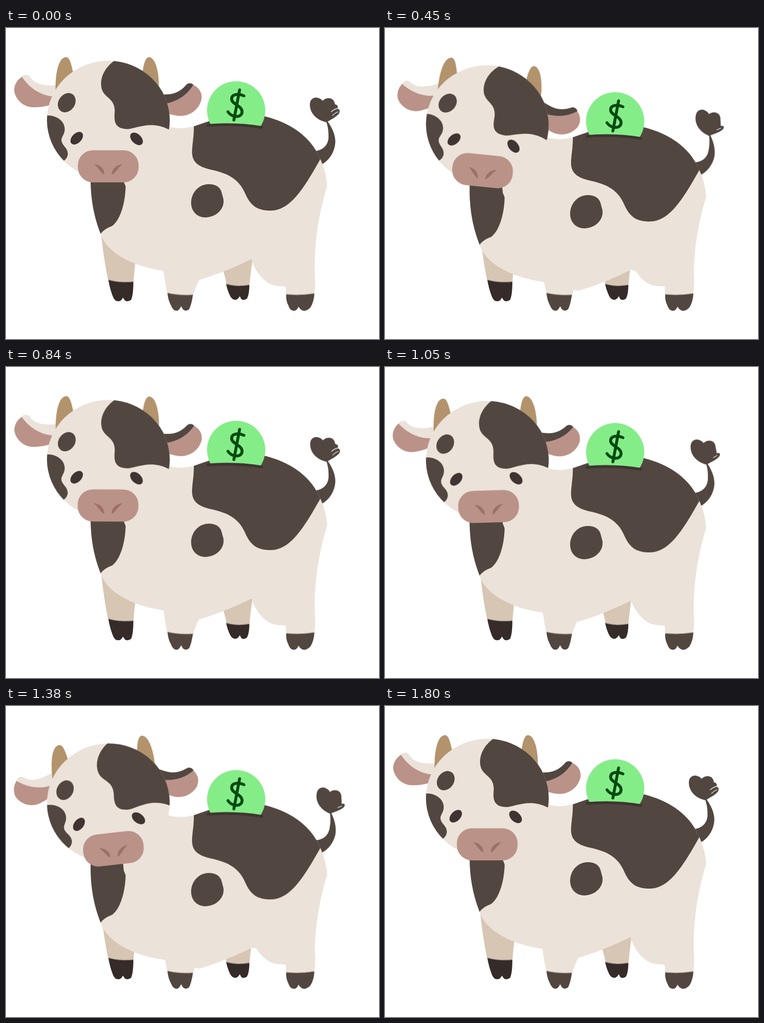
Animation of 820 by 683 pixels, one loop 1.86 s. Source, as an HTML page without scripts:

```html
<!DOCTYPE html>
<html lang="en">
<head>
<meta charset="utf-8">
<title>Cow bank</title>
<style>
  html, body { margin: 0; width: 100%; height: 100%; overflow: hidden; background: #fff; }
  svg { display: block; width: 100vw; height: 100vh; }

  .cream { fill: #ebe2d9; }
  .dark { fill: #524740; }
  .tan { fill: #d7c6b4; }
  .hoof { fill: #352b29; }
  .horn { fill: #b3936c; }
  .pink { fill: #bb9288; }
  .nostril { fill: #9b7067; }
  .eye { fill: #3f3431; }
  .coin { fill: #84ed88; }
  .line { fill: none; stroke-linecap: round; stroke-linejoin: round; }
  .slot { stroke: #3f3431; stroke-width: 6; }
  .sign { stroke: #034a10; stroke-width: 6.4; }
  .gap { stroke: #fff; stroke-width: 1.3; }
  .cuff { stroke: #9a8f86; stroke-width: 1.4; stroke-linecap: butt; }

  /* 1800 ms of movement, then a 60 ms rest */
  .bob, .tail, .head, .ear, .strands { animation: bob 1860ms cubic-bezier(.365, 0, .635, 1) infinite; }
  .tail { animation-name: tail; transform-origin: 675px 255px; }
  .head { animation-name: head; transform-origin: 225px 202px; }
  .left { animation-name: left-ear; transform-origin: 103px 135px; }
  .right { animation-name: right-ear; transform-origin: 352px 155px; }
  .strands { animation-name: strands; animation-timing-function: step-end; }

  @keyframes bob {
    0%, 48.387%, 96.774%, 100% { transform: translateY(0); }
    24.194%, 72.581% { transform: translateY(24px); }
  }
  @keyframes tail {
    0%, 48.387%, 96.774%, 100% { transform: rotate(0deg); }
    24.194%, 72.581% { transform: rotate(10deg); }
  }
  @keyframes head {
    0%, 48.387%, 96.774%, 100% { transform: translateY(0) rotate(0deg); }
    24.194% { transform: translateY(10px) rotate(5.8deg); }
    72.581% { transform: translateY(10.5px) rotate(-6.5deg); }
  }
  @keyframes left-ear {
    0%, 48.387%, 96.774%, 100% { transform: rotate(0deg); animation-timing-function: cubic-bezier(.4, .3, .65, 1); }
    24.194%, 72.581% { transform: rotate(-20deg); animation-timing-function: cubic-bezier(.35, 0, .6, .7); }
  }
  @keyframes right-ear {
    0%, 48.387%, 96.774%, 100% { transform: rotate(0deg); animation-timing-function: cubic-bezier(.4, .3, .65, 1); }
    24.194%, 72.581% { transform: rotate(25deg); animation-timing-function: cubic-bezier(.35, 0, .6, .7); }
  }
  @keyframes strands {
    0%, 43.548%, 91.935% { opacity: 1; }
    4.839%, 53.226% { opacity: 0; }
  }
</style>
</head>
<body>
<svg viewBox="0 0 820 683" preserveAspectRatio="none">
  <defs>
    <clipPath id="face"><ellipse cx="225" cy="202" rx="135" ry="130"/></clipPath>
    <clipPath id="above"><path d="M430 100H580V219L563 218Q505 208 444 214L430 214Z"/></clipPath>
  </defs>

  <!-- far legs -->
  <path class="tan" d="M209 440L210 460Q216 515 225 556L280 559Q282 535 286 500V440Z"/>
  <path class="hoof" d="M225 553Q250 560 280 557Q280 586 275 597Q267 603 261 598L257 592Q253 601 246 600Q239 600 235 590Q228 572 225 553Z"/>
  <path class="line cuff" d="M225 553Q250 560 280 557"/>
  <path class="tan" d="M470 500L478 535Q483 550 485 564L535 566Q538 535 543 500Z"/>
  <path class="hoof" d="M484 562Q508 569 535 564Q535 584 530 594Q523 600 517 595L514 589Q510 597 503 597Q496 596 492 587Q486 574 484 562Z"/>
  <path class="line cuff" d="M484 562Q508 569 535 564"/>

  <!-- near legs -->
  <path class="cream" d="M344 515L346 533Q350 562 355 584L411 588Q416 570 425 553V515Z"/>
  <path class="dark" d="M355 582Q382 588 411 586Q408 606 403 617Q396 624 389 618L385 611Q381 621 374 621Q367 620 363 610Q356 597 355 582Z"/>
  <path class="line cuff" d="M355 582Q382 588 411 586"/>
  <path class="cream" d="M536 490L541 513C555 548 578 568 604 567L615 568L616 588L677 586Q681 565 679 543L678 500L640 450Z"/>
  <path class="dark" d="M616 585Q647 588 678 583Q677 602 669 614Q661 622 654 621Q648 620 643 612Q639 622 632 621Q624 620 621 610Q615 599 616 585Z"/>
  <path class="line cuff" d="M616 585Q647 588 678 583"/>

  <g class="bob">
    <g class="tail">
      <path class="dark" d="M672 272L682 270C699 267 710 255 709 236C709 224 707 214 704 206L707 205C717 219 724 234 724 250C723 273 710 290 697 298L680 300Z"/>
      <path class="dark" d="M705 207C685 203 668 189 668 168C668 156 677 152 684 153Q693 155 696 160C702 153 712 152 718 157C724 163 722 167 724 171L726 181C734 178 735 184 731 189C725 196 714 201 705 207Z"/>
      <path class="line gap" d="M719 191L727 186"/>
      <g class="strands">
        <path class="dark" d="M720 167C730 168 731 173 728 177C735 178 735 185 730 190L718 194Z"/>
        <path class="line gap" d="M715 184Q722 178 728 177M718 192Q724 186 730 184"/>
      </g>
    </g>

    <path class="cream" d="M186 338V260L340 210Q365 221 387 220Q401 219 413 216L445 205Q505 180 569 194C625 208 662 236 682 270L691 288Q704 316 706 347C688 405 679 462 678 532L650 540L600 520L541 507Q480 537 425 553L345 533C310 528 270 516 240 494Q216 475 209 455Q187 400 186 338Z"/>
    <path class="dark" d="M413 216L445 205Q505 180 569 194C625 208 662 236 682 270L691 288C655 352 625 401 582 401C553 401 538 391 526 364C511 328 482 318 450 311C426 305 409 297 409 272C410 250 413 240 413 216Z"/>
    <path class="dark" d="M186 338V310H256L259 338L263 348C262 390 249 424 233 435Q216 441 208 452Q187 400 186 338Z"/>
    <path class="dark" d="M444 343C458 342 471 348 474 361L478 376C481 398 462 416 437 416C418 415 407 401 407 384C407 363 422 344 444 343Z"/>

    <circle class="coin" cx="506" cy="181" r="64" clip-path="url(#above)"/>
    <path class="line sign" d="M513.500 136L501 202M523 149C513 144 496 144 496 156C496 168 520 170 519 185C517 199 495 196 488 184"/>
    <path class="line slot" d="M444 214Q505 209 562 218.500"/>
  </g>

  <g class="head">
    <g class="ear left">
      <path class="cream" d="M35 107C40 101 50 101 54 109C64 124 85 127 107 126L125 126V152L102 150C75 148 50 130 35 107Z"/>
      <path class="pink" d="M35 107C22 116 18 127 18 137C20 156 38 175 62 174Q82 174 97 169L115 163V151L102 150C75 148 50 130 35 107Z"/>
    </g>
    <g class="ear right">
      <path class="dark" d="M330 146H349C375 146 387 135 396 125C400 120 408 120 412 125C398 148 378 160 354 166H330Z"/>
      <path class="pink" d="M412 125C425 131 431 142 430 155C426 178 405 193 385 193Q370 193 354 187L335 180V167L354 166C378 160 398 148 412 125Z"/>
    </g>
    <path class="horn" d="M109 140C108 100 115 66 131 64C141 63 144 83 148 99L150 130Z"/>
    <path class="horn" d="M300 99C302 81 306 65 314 64C328 64 337 95 336 133L310 130Z"/>

    <g clip-path="url(#face)">
      <rect class="cream" x="85" y="65" width="280" height="275"/>
      <path class="dark" d="M238 72C220 85 209 103 209 123C209 155 240 150 239 183C238 200 235 222 268 222C290 220 318 203 358 223L380 230V60H240Z"/>
      <path class="dark" d="M80 192H91C113 192 128 205 129 220C130 233 122 238 122 246C122 258 136 262 136 277Q135 286 128 291L110 310L80 290Z"/>
    </g>
    <ellipse class="dark" cx="133.500" cy="164" rx="18" ry="22.500" transform="rotate(35 133.500 164)"/>
    <ellipse class="eye" cx="155.500" cy="242" rx="16.500" ry="10.500" transform="rotate(-46 155.500 242)"/>
    <ellipse class="eye" cx="287" cy="243.500" rx="16.500" ry="10.500" transform="rotate(44 287 243.500)"/>
    <rect class="pink" x="158" y="268.500" width="133.500" height="70.500" rx="33"/>
    <path class="nostril" d="M194 299C206 300 217 309 216 322C208 318 204 308 194 299Z"/>
    <path class="nostril" d="M256 299C244 300 232 309 233 322C241 318 245 308 256 299Z"/>
  </g>
</svg>
</body>
</html>
```
